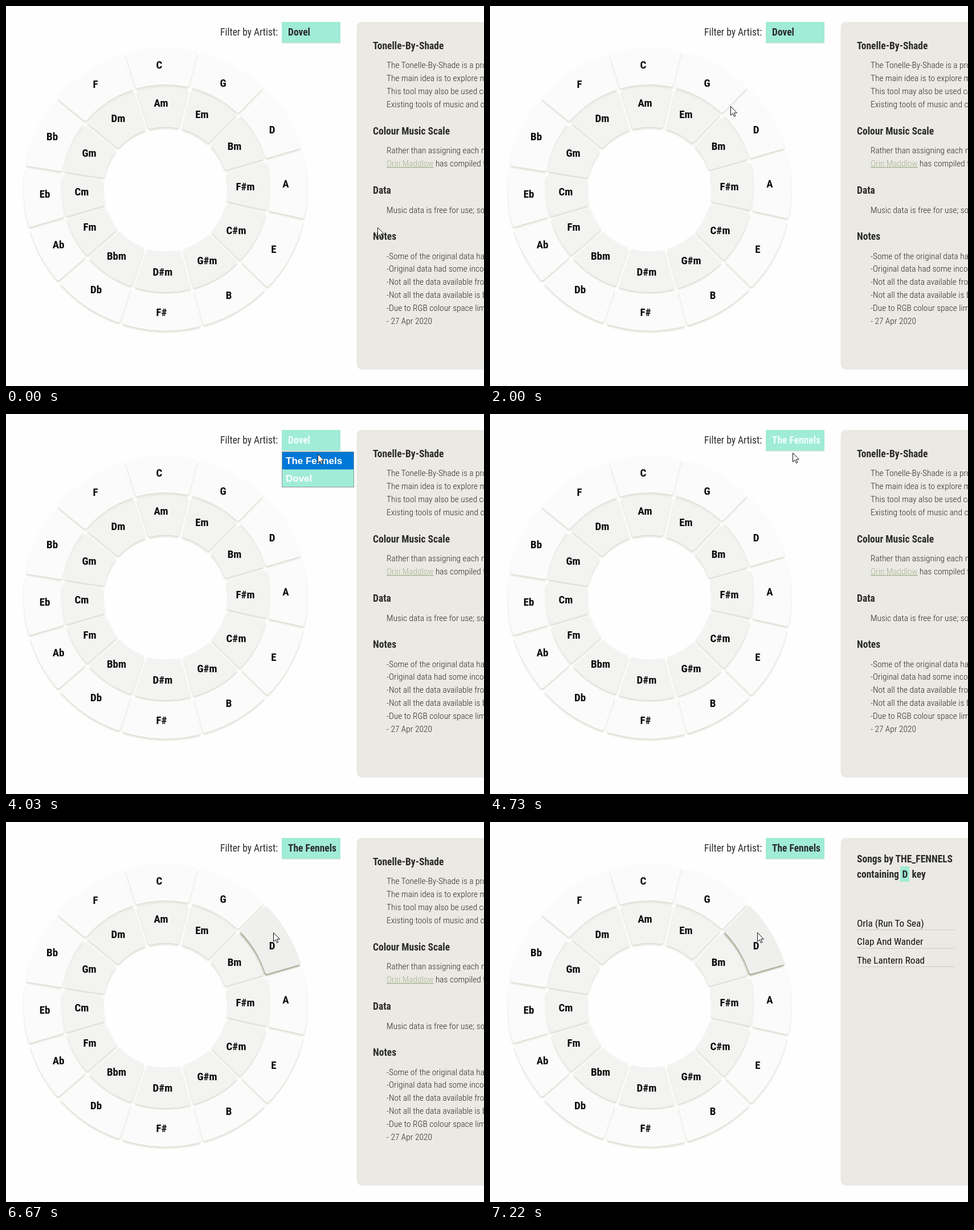
An HTML page that plays this animation: 839x668 px, repeating every 8000 ms.

```html
<!DOCTYPE html>
<html lang="en">
<head>
<meta charset="utf-8">
<title>Colour wheel of chords</title>
<style>
  html, body { margin: 0; width: 100%; height: 100%; overflow: hidden; background: #fefefe; }
  svg { display: block; }
  text { font: 17.5px "Roboto Condensed", Roboto, sans-serif; font-stretch: condensed; fill: #2b2b2b; white-space: pre; }
  .bold { font-weight: 700; }
  .body { font-size: 15.4px; font-weight: 300; }
  .song { font-size: 17.2px; fill: #111; }
  .chord { font-size: 19px; font-weight: 700; fill: #0a0a0a; text-anchor: middle; }
  .option { font: 700 17px "Liberation Sans", Arial, sans-serif; fill: #fff; }
  .link { fill: #a5b596; text-decoration: underline; }
  .sector { stroke-width: 8; stroke-linejoin: round; filter: drop-shadow(0 3px 1.5px #deded5); }
  .inner { fill: #f3f3f2; stroke: #f3f3f2; }
  .outer { fill: #fbfbfb; stroke: #fbfbfb; }
  .hover { fill: #efefee; stroke: #efefee; filter: drop-shadow(-1px 3px 1.5px #9fa28a); }
</style>
</head>
<body>
<svg id="stage" width="839" height="668" viewBox="0 0 839 668"></svg>
<script>
const MINT = '#a0ecd6', PANEL = '#ebe9e3';
const BAND = 'The Fennels', OTHER_BAND = 'Dovel';

// Narrow the text only where no condensed face is installed.
const ctx = document.createElement('canvas').getContext('2d');
const widthIn = font => { ctx.font = font; return ctx.measureText('Filter by Artist').width; };
const narrow = widthIn('condensed 100px "Roboto Condensed", Roboto, sans-serif') <
  0.95 * widthIn('100px Roboto, sans-serif') ? 1 : 0.88;

const text = (x, y, cls, str, id = '') =>
  `<text id="${id}" class="${cls}" transform="translate(${x} ${y}) scale(${cls === 'option' ? 1 : narrow} 1)">${str}</text>`;
const rect = (x, y, w, h, fill, extra = '') =>
  `<rect x="${x}" y="${y}" width="${w}" height="${h}" fill="${fill}" ${extra}/>`;

// Wheel: both rings share the same sector boundaries (degrees clockwise from the top).
const bounds = [-17.1, 13.6, 44.5, 73.7, 102.6, 134.6, 165, 198.4, 228.8, 253.8, 279, 309.4, 342.9];
const outer = [
  ['C', 269, 103], ['G', 381, 135], ['D', 467, 217], ['A', 491, 312],
  ['E', 470, 427], ['B', 391, 508], ['F#', 273, 538], ['Db', 158, 498],
  ['Ab', 92, 419], ['Eb', 68, 330], ['Bb', 81, 229], ['F', 157, 137]];
const inner = [
  ['Am', 272, 170], ['Em', 344, 190], ['Bm', 401, 246], ['F#m', 420, 317],
  ['C#m', 404, 394], ['G#m', 353, 447], ['D#m', 275, 467], ['Bbm', 194, 439],
  ['Fm', 147, 388], ['Cm', 133, 326], ['Gm', 146, 258], ['Dm', 197, 197]];

function sectorPath(r0, r1, from, to) {
  const at = (r, deg, side) => {
    const a = deg * Math.PI / 180 + side * Math.asin(6.5 / r);
    return `${(280 + r * Math.sin(a)).toFixed(1)} ${(322 - r * Math.cos(a)).toFixed(1)}`;
  };
  r0 += 4; r1 -= 4; // room for the rounding stroke
  return `M${at(r0, from, 1)}L${at(r1, from, 1)}A${r1} ${r1} 0 0 1 ${at(r1, to, -1)}` +
    `L${at(r0, to, -1)}A${r0} ${r0} 0 0 0 ${at(r0, from, 1)}Z`;
}
const ring = (chords, kind, r0, r1) => chords.map(([name], i) =>
  `<path id="sector-${name}" class="sector ${kind}" d="${sectorPath(r0, r1, bounds[i], bounds[i + 1])}"/>`).join('');
const chordLabels = [...outer, ...inner].map(([name, x, y]) => text(x, y + 7, 'chord', name)).join('');

const panelBox = rect(615.5, 28, 300, 611, PANEL, 'rx="9"');
const sections = [
  [75.5, 'Tonelle-By-Shade', [
    'The Tonelle-By-Shade is a project', 'The main idea is to explore music',
    'This tool may also be used casually', 'Existing tools of music and colour']],
  [225.5, 'Colour Music Scale', [
    'Rather than assigning each note', '<tspan class="link">Orin Maddlow</tspan> has compiled the scales']],
  [330, 'Data', ['Music data is free for use; sources']],
  [411, 'Notes', [
    '-Some of the original data had', '-Original data had some inconsistencies',
    '-Not all the data available from', '-Not all the data available is being',
    '-Due to RGB colour space limits', '- 27 Apr 2020']]];
const about = sections.map(([y, title, lines]) => text(644, y, 'bold', title) +
  lines.map((line, i) => text(668, y + 33.5 + i * 22.9, 'body', line)).join('')).join('');

const songs = ['Orla (Run To Sea)', 'Clap And Wander', 'The Lantern Road'].map((song, i) =>
  text(644, 183.5 + i * 32.5, 'song', song) + rect(644, 189 + i * 32.5, 171, 1, '#cbcac6')).join('');

document.getElementById('stage').innerHTML =
  rect(0, 0, 839, 668, '#fefefe') +
  ring(inner, 'inner', 109.5, 181) + ring(outer, 'outer', 184, 248.5) + chordLabels +
  text(376, 52, '', 'Filter by Artist:') +
  rect(484, 29, 103, 37, '#dfe3e0') + rect(484, 28, 103, 36.5, MINT) +
  text(495, 52, 'bold', OTHER_BAND, 'choice') +
  `<g id="about">${panelBox}${about}</g>` +
  `<g id="results">${panelBox}` +
    text(644, 71, 'bold', 'Songs by THE_FENNELS') + text(644, 97.5, 'bold', 'containing') +
    rect(720, 78, 16, 27, MINT) + text(723.5, 97.5, 'bold', 'D') + text(740.5, 97.5, 'bold', 'key') +
    songs + '</g>' +
  '<g id="menu">' + rect(484.5, 66.5, 126, 62, MINT, 'stroke="#8e9a96"') +
    rect(485, 67, 125, 30.5, '#0078d7', 'id="highlight"') +
    text(491, 88, 'option', BAND) + text(491, 118.5, 'option', OTHER_BAND) + '</g>' +
  '<path id="cursor" d="M.5.5V16.2L4.1 12.8 6.5 18.4 8.8 17.4 6.4 11.9H11.4Z" fill="#fff" stroke="#111"/>';

// The screen only refreshes in bursts: [start, end, steps].
const bursts = [[70, 460, 6], [690, 990, 5], [1540, 2240, 10], [3020, 3650, 9],
  [3880, 4270, 6], [6060, 6670, 9], [6840, 7220, 6]];
function snap(t) {
  for (const [start, end, steps] of bursts) {
    if (t < start || t > end) continue;
    const step = (end - start) / (steps - 1);
    return start + Math.floor((t - start) / step + 0.1) * step;
  }
  return t;
}

const cursorKeys = [
  [0, 652, 389], [460, 593, 198], [615, 593, 198], [990, 521, 107],
  [1159, 521, 107], [1160, 520, 107], [1389, 520, 107], [1390, 520, 106],
  [1462, 520, 106], [1700, 487, 140], [1850, 455, 166], [2000, 423, 177], [2240, 393, 153],
  [2639, 393, 153], [2640, 389, 149], [2941, 389, 149],
  [3250, 511, 67], [3420, 522, 33], [3570, 524, 45], [3802, 524, 45],
  [4030, 547, 70], [4270, 543, 71], [4579, 543, 71], [4580, 531, 68],
  [5982, 531, 68], [6060, 530, 97], [6670, 469, 194], [8000, 469, 194]];
function cursorAt(t) {
  const i = Math.max(1, cursorKeys.findIndex(key => key[0] >= t));
  const [t0, x0, y0] = cursorKeys[i - 1], [t1, x1, y1] = cursorKeys[i];
  const p = (t - t0) / (t1 - t0);
  return [Math.round(x0 + (x1 - x0) * p), Math.round(y0 + (y1 - y0) * p)];
}

const el = id => document.getElementById(id);
const between = (t, from, to) => t >= from && t < to;
const show = (id, visible) => el(id).style.display = visible ? '' : 'none';

function draw() {
  const t = snap(performance.now() % 8000);
  el('cursor').setAttribute('transform', `translate(${cursorAt(t)})`);
  el('sector-D').classList.toggle('hover', between(t, 1830, 1985) || t >= 6520);
  el('sector-G').classList.toggle('hover', between(t, 2060, 3130));
  el('choice').textContent = t < 4730 ? OTHER_BAND : BAND;
  el('choice').style.fill = between(t, 3640, 6660) ? '#f0fffa' : '';
  show('menu', between(t, 3640, 4730));
  el('highlight').setAttribute('y', t < 4000 ? 97.5 : 67);
  show('about', t < 6840);
  el('results').style.opacity = Math.min(1, Math.max(0, (t - 6840) / 380));
  requestAnimationFrame(draw);
}
draw();
</script>
</body>
</html>
```
